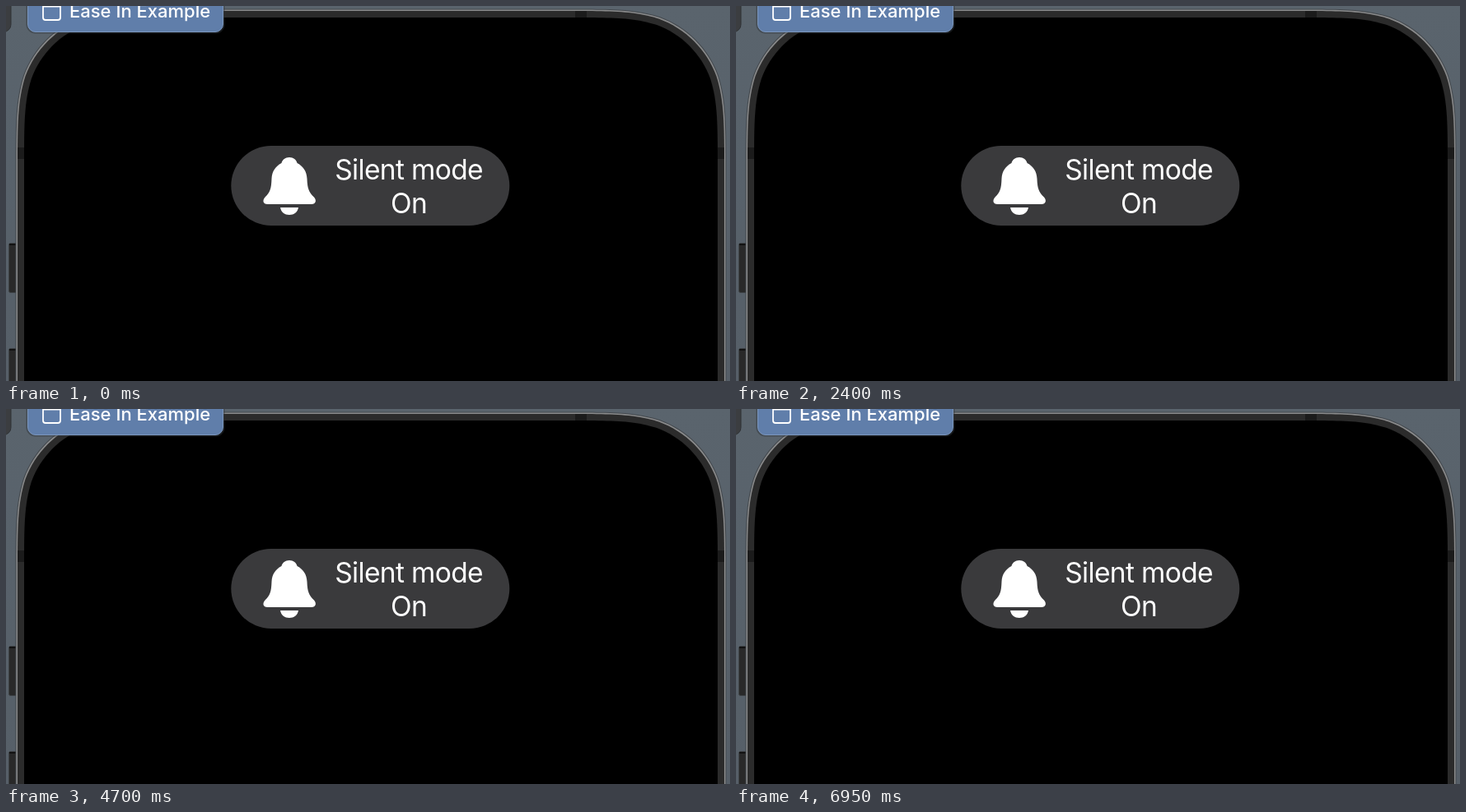
An HTML page that plays this animation: 879 px wide and 456 px high, repeating every 7.8 s.

```html
<!DOCTYPE html>
<html lang="en">
<head>
<meta charset="utf-8">
<title>Silent mode banner</title>
<style>
  html, body { margin: 0; width: 100%; height: 100%; overflow: hidden; background: #59626b; }
  svg { display: block; }
  text { font-family: Inter, "Open Sans", sans-serif; fill: #fff; font-optical-sizing: none; }
  .title { font-size: 22px; font-weight: 500; }
  .banner-text { font-size: 33.5px; letter-spacing: -.65px; text-anchor: middle; }
</style>
</head>
<body>
<svg width="879" height="456" viewBox="0 0 879 456">
  <defs>
    <clipPath id="screenClip"><path id="screenEdge"/></clipPath>
    <linearGradient id="backdrop" x2="0" y2="1">
      <stop stop-color="#5a646d"/><stop offset="1" stop-color="#565f68"/>
    </linearGradient>
  </defs>
  <rect width="879" height="456" fill="url(#backdrop)"/>

  <g fill="#292929" stroke="#3d4145">
    <rect x="3.5" y="288.5" width="12" height="60" rx="2"/>
    <rect x="3.5" y="416.5" width="12" height="60" rx="2"/>
  </g>
  <path d="M4 290H12M4 418H12" stroke="#121212" stroke-width="2"/>

  <path id="shadowEdge" fill="#43484d"/>
  <path id="rimEdge" fill="#898a8b"/>
  <path id="bezelEdge" fill="#2b2b2b"/>
  <path d="M691 6h14v8h-14zM14 172h8v14h-8zM864 172h8v14h-8z" fill="#1b1b1b"/>
  <path id="screen" fill="#000"/>

  <g clip-path="url(#screenClip)">
    <g id="banner">
      <rect x="273.3" y="170" width="338" height="97" rx="48.5" fill="#3a3a3c"/>
      <path fill="#fff" d="M334.5 191C335.5 187 339 184 344 184S352.500 187 353.500 191
        C361 195 365 201 365.500 210C366 222 367.500 226 374 232.500C377.500 236.500 376 241 371 241
        H317.500C312 241 311 236.500 314.500 232.500C321 226 322 222 322.500 210C323 201 327 195 334.500 191Z
        M333 245H355C354 251 349.500 254 344 254S334 251 333 245Z"/>
      <text class="banner-text" x="489" y="211">Silent mode</text>
      <text class="banner-text" x="489" y="251.500">On</text>
    </g>
  </g>

  <rect x="-30" y="-20" width="36" height="51.500" rx="9" fill="#3b3d40" stroke="#2f3235"/>
  <rect x="25.500" y="-20" width="239" height="52.500" rx="10" fill="none" stroke="#30363d" stroke-opacity=".5" stroke-width="2"/>
  <rect x="26.500" y="-20" width="237" height="51.500" rx="9.500" fill="#607eaa" stroke="#7b96bd"/>
  <g id="windowIcon" fill="none" stroke="#fff" stroke-width="1.800">
    <rect x="45" y="-2" width="21" height="19" rx="3"/>
    <path d="M45 .6H66"/>
  </g>
  <g id="spinner" stroke="#fff" stroke-width="2" stroke-linecap="round"></g>
  <text class="title" x="77" y="14">Ease In Example</text>
</svg>

<script>
const LOOP = 7800, STEP = 50, TRAVEL = 267, SPOKES = 8;
const ENTER_DELAY = 50, ENTER_TIME = 250;
const cycles = [
  { exit: 850, lift: 119, enter: 1900, rest: 2400 },
  { exit: 3400, lift: 119, enter: 4250, rest: 4700 },
  { exit: 5700, lift: 57, enter: 6550, rest: 6950 }
];
const byId = id => document.getElementById(id);

// Phone outline with continuous-curvature top corners.
function phonePath(left, top, right, r) {
  const curve = [[0, 1.5287], [0, 1.0885], [0, .8684], [.0749, .6315],
    [.1691, .3728], [.3728, .1691], [.6315, .0749], [.8684, 0], [1.0885, 0], [1.5287, 0]];
  const at = ([x, y]) => `${left + x * r} ${top + y * r}`;
  const mirrored = ([x, y]) => `${right - x * r} ${top + y * r}`;
  const corner = (points, place) => {
    const p = points.map(place);
    return `${p[0]}C${p.slice(1).join(' ')}`;
  };
  return `M${left} 480L${corner(curve, at)}L${corner([...curve].reverse(), mirrored)}L${right} 480Z`;
}

byId('shadowEdge').setAttribute('d', phonePath(11.5, 3.5, 874.5, 128));
byId('rimEdge').setAttribute('d', phonePath(12.5, 4.5, 873.5, 127));
byId('bezelEdge').setAttribute('d', phonePath(14, 6, 872, 126));
for (const id of ['screen', 'screenEdge']) byId(id).setAttribute('d', phonePath(22, 14, 864, 118));

const spinner = byId('spinner');
for (let i = 0; i < SPOKES; i++) {
  const spoke = document.createElementNS(spinner.namespaceURI, 'path');
  spoke.setAttribute('d', 'M55 1.500V-2.500');
  spoke.setAttribute('transform', `rotate(${i * 360 / SPOKES} 55 6)`);
  spinner.append(spoke);
}

// Distance of the banner above its resting place.
function bannerLift(t, cycle) {
  if (!cycle) return 0;
  const leaving = t - cycle.exit;
  if (leaving < 2 * STEP) return 7 * (cycle.lift / 7) ** (leaving / STEP);
  const progress = (t - cycle.enter - ENTER_DELAY) / ENTER_TIME;
  return TRAVEL * (1 - Math.min(1, Math.max(0, progress)) ** 2);
}

function draw(now) {
  const t = Math.floor(now % LOOP / STEP) * STEP;
  const cycle = cycles.findLast(c => t >= c.exit);
  byId('banner').setAttribute('transform', `translate(0 ${-bannerLift(t, cycle)})`);

  const busy = Boolean(cycle) && t >= cycle.enter && t < cycle.rest;
  spinner.style.display = busy ? '' : 'none';
  byId('windowIcon').style.display = busy ? 'none' : '';
  if (busy) {
    const head = 6 + (t - cycle.enter) / 100;
    [...spinner.children].forEach((spoke, i) => {
      const age = (head - i + SPOKES) % SPOKES;
      spoke.style.opacity = .75 - .07 * age;
    });
  }
}

const start = performance.now();
function tick() {
  draw(performance.now() - start);
  requestAnimationFrame(tick);
}
tick();
</script>
</body>
</html>
```
